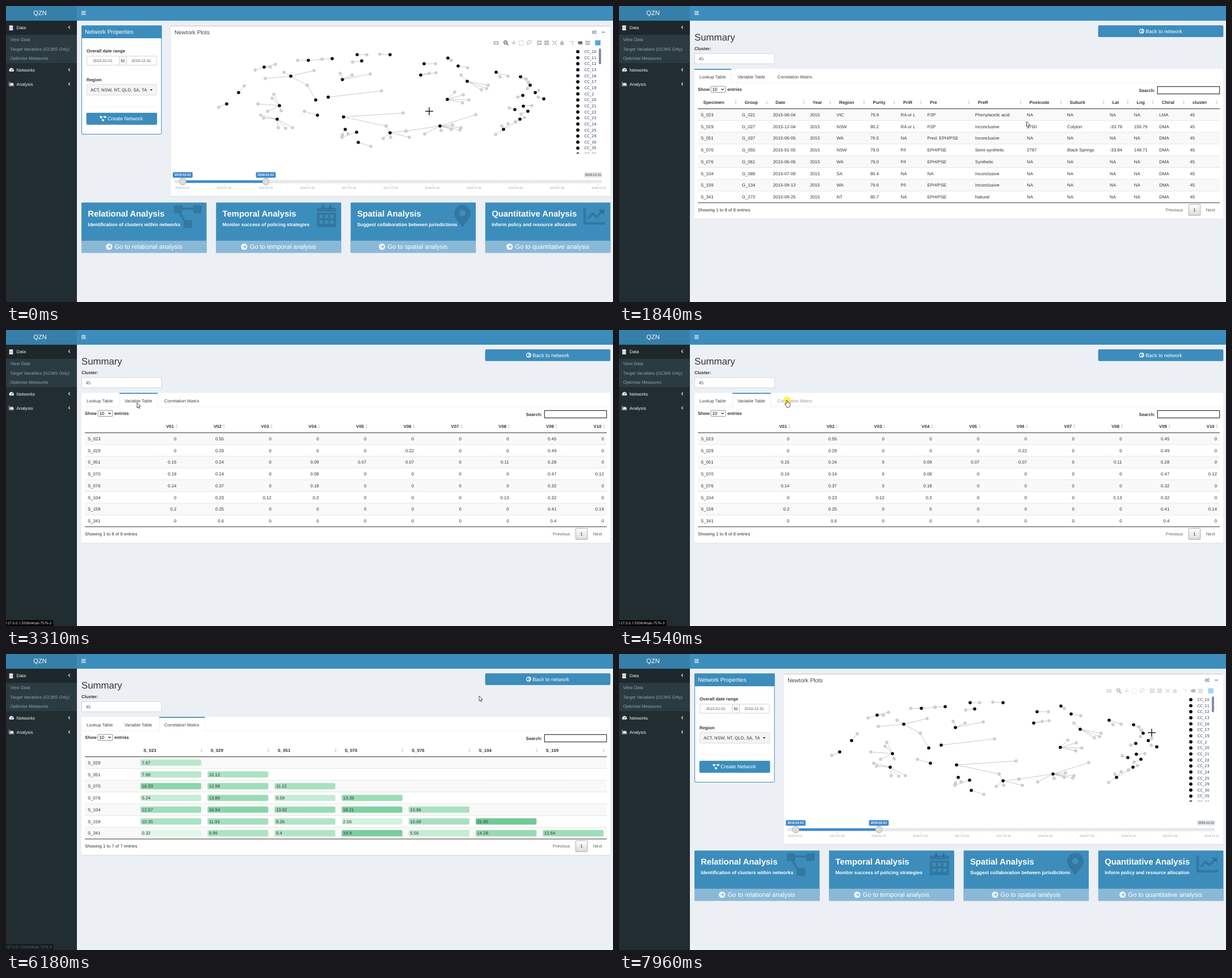
An HTML page with a canvas that plays this animation: 1070 by 523 pixels, repeating every 8.04 s.

```html
<!DOCTYPE html>
<html lang="en">
<head>
<meta charset="utf-8">
<title>Network dashboard</title>
<style>
html, body { margin: 0; width: 100%; height: 100%; overflow: hidden; background: #ecf0f5; }
canvas { display: block; }
</style>
</head>
<body>
<canvas id="stage" width="1070" height="523"></canvas>
<script>
const ctx = document.getElementById('stage').getContext('2d');
const LOOP = 8040;
const BLUE = '#3c8dbc', SHADE = 'rgba(0,0,0,0.15)';
const SANS = '"Liberation Sans", Arial, sans-serif';

// ---------- drawing helpers ----------
function text(str, x, y, size = 7.8, color = '#333', { bold, align = 'left', family = SANS } = {}) {
  ctx.font = `${bold ? 'bold ' : ''}${size}px ${family}`;
  ctx.textAlign = align;
  ctx.fillStyle = color;
  ctx.fillText(str, x, y + size * 0.355);
}
const bold = (str, x, y, size, color, align) => text(str, x, y, size, color, { bold: true, align });

function paint(fill, stroke, width = 1) {
  if (fill) { ctx.fillStyle = fill; ctx.fill(); }
  if (stroke) { ctx.strokeStyle = stroke; ctx.lineWidth = width; ctx.stroke(); }
}
function box(x, y, w, h, fill, stroke, radius = 0, width = 1) {
  ctx.beginPath();
  ctx.roundRect(x, y, w, h, radius);
  paint(fill, stroke, width);
}
function disc(x, y, r, fill, stroke, width) {
  ctx.beginPath();
  ctx.arc(x, y, r, 0, 7);
  paint(fill, stroke, width);
}
function trace(points, close) {
  ctx.beginPath();
  for (let i = 0; i < points.length; i += 2) ctx.lineTo(points[i], points[i + 1]);
  if (close) ctx.closePath();
}
function line(points, color, width = 1) {
  trace(points);
  paint(null, color, width);
}
function poly(points, fill, stroke, width) {
  trace(points, true);
  paint(fill, stroke, width);
}
function at(x, y, scale, draw) {
  ctx.save();
  ctx.translate(x, y);
  ctx.scale(scale, scale);
  draw();
  ctx.restore();
}

// ---------- icons ----------
function diagramIcon(x, y, scale, color) {
  at(x, y, scale, () => {
    for (const [sx, sy] of [[0, 0], [34, 0], [17, 26]]) box(sx, sy, 15, 14, color, null, 2);
    line([15, 6, 34, 6], color, 4);
    line([10, 14, 18, 26], color, 4);
  });
}
function calendarIcon() {
  box(557, 351, 4, 7, SHADE);
  box(570, 351, 4, 7, SHADE);
  box(548, 356, 34, 7, SHADE, null, [3, 3, 0, 0]);
  ctx.beginPath();
  ctx.roundRect(548, 365, 34, 26, [0, 0, 3, 3]);
  for (let i = 0; i < 6; i++) ctx.rect(552.5 + (i % 3) * 9.5, 369 + (i > 2) * 10, 6, 6);
  ctx.fillStyle = SHADE;
  ctx.fill('evenodd');
}
function pinIcon() {
  ctx.beginPath();
  ctx.moveTo(804.5, 391);
  ctx.bezierCurveTo(795, 378, 790, 374, 790, 366);
  ctx.arc(804.5, 366, 14.5, Math.PI, 0);
  ctx.bezierCurveTo(819, 374, 814, 378, 804.5, 391);
  ctx.moveTo(810, 366);
  ctx.arc(804.5, 366, 5.5, 0, 7);
  ctx.fillStyle = SHADE;
  ctx.fill('evenodd');
}
function trendIcon() {
  line([1020, 356, 1020, 384, 1056, 384], SHADE, 4.5);
  line([1026, 376, 1034, 367, 1041, 373, 1051, 363], SHADE, 4.5);
  poly([1044, 359, 1055, 359, 1055, 370], SHADE);
}
function circleArrow(x, y, r, dir, color) {
  disc(x, y, r, '#fff');
  line([x - dir * 3.2, y, x + dir * 2.6, y], color, 1.5);
  line([x, y - 3, x + dir * 3, y, x, y + 3], color, 1.5);
}
function modebar(alpha) {
  if (!alpha) return;
  const pale = '#bdbdbd', dark = '#6e6e6e', y = 65;
  ctx.save();
  ctx.globalAlpha = alpha;
  box(859.5, 62, 9, 6.5, pale, null, 1);
  disc(864, 65.3, 1.8, '#fff');
  disc(880.5, 64.3, 2.8, null, dark, 1.4);
  line([882.5, 66.5, 885.5, 69.5], dark, 1.6);
  line([878.8, 64.3, 882.2, 64.3], dark, 0.8);
  line([891, y, 899, y], pale, 1.3);
  line([895, 61, 895, 69], pale, 1.3);
  ctx.setLineDash([1.5, 1]);
  box(904.5, 61.5, 7.5, 7.5, null, pale);
  ctx.setLineDash([]);
  ctx.beginPath();
  ctx.ellipse(922, 64, 4, 2.6, -0.3, 0, 7);
  paint(null, pale, 1.2);
  line([919, 66, 920, 69], pale, 1.2);
  for (const x of [940, 953]) {
    box(x - 4, 61, 8, 8, pale);
    line([x - 2.5, y, x + 2.5, y], '#fff', 1.2);
  }
  line([940, 62.5, 940, 67.5], '#fff', 1.2);
  line([963, 61, 971, 69], pale, 1.3);
  line([971, 61, 963, 69], pale, 1.3);
  disc(967, y, 1.6, '#fff', pale);
  poly([975.5, 65.5, 980, 61, 984.5, 65.5, 983, 65.5, 983, 69, 977, 69, 977, 65.5], pale);
  line([993, 62.5, 999, 62.5, 999, 69], pale, 1.2);
  poly([1007.5, y, 1010, 62.3, 1016, 62.3, 1016, 67.7, 1010, 67.7], dark);
  box(1021, 61.5, 8.5, 3.2, pale);
  box(1021, 65.7, 8.5, 3.2, pale);
  box(1038.5, 60.5, 9.5, 9, '#46a9df');
  ctx.restore();
}

// ---------- frame around every page ----------
function shell() {
  box(0, 0, 1070, 523, '#ecf0f5');
  box(125, 0, 945, 26, BLUE);
  box(0, 0, 125, 26, '#367fa9');
  text('QZN', 60, 12, 11.1, '#fff', { align: 'center' });
  for (const y of [9, 11.7, 14.4]) box(133, y, 7.5, 1.2, '#fff');
  box(0, 26, 125, 497, '#222d32');
  box(0, 26, 125, 25, '#1e282c');
  box(0, 51, 125, 50, '#2c3b41');

  for (const y of [34.5, 37.5, 40.5]) box(5.5, y, 7, 2.4, '#fff', null, 1);
  ctx.beginPath();
  ctx.arc(9.7, 113.7, 4.2, 2.6, 0.54);
  ctx.closePath();
  paint('#e4eaec');
  line([9.7, 114.5, 11.3, 111], '#222d32', 0.9);
  line([5.8, 134, 5.8, 141, 14, 141], '#e4eaec', 1);
  poly([7, 140, 7, 137.5, 9, 135, 10.5, 136.8, 12, 135.5, 13.4, 138, 13.4, 140], '#e4eaec');

  [['Data', 38], ['Networks', 113], ['Analysis', 138]].forEach(([name, y]) => {
    text(name, 18.5, y, 7.8, '#eef2f3');
    line([112.7, y - 2.8, 110.2, y - 0.4, 112.7, y + 2], '#eef2f3', 1.1);
  });
  ['View Data', 'Target Variables (GCMS Only)', 'Optimise Measures']
    .forEach((name, i) => text(name, 7.3, 59 + i * 16.8, 7.8, '#8aa4af'));
}

// ---------- network page ----------
const stars = [];
const star = (x, y, ...leaves) => stars.push({ x, y, leaves });
star(455, 108, 475, 103, 439, 113, 466, 108);
star(502, 124, 490, 117, 543, 114, 457, 128, 531, 140);
star(546, 166, 531, 140);
star(533, 96, 514, 96, 557, 94);
star(575, 93, 557, 94);
star(410, 153, 420, 141);
star(389, 173, 375, 179);
star(482, 176, 472, 156, 469, 163, 444, 173, 461, 186, 485, 185);
star(478, 200, 449, 193, 454, 198, 480, 215, 493, 216, 505, 215);
star(549, 193, 526, 186);
star(568, 161, 662, 150);
star(595, 196, 700, 189, 670, 212);
star(677, 224, 670, 212, 665, 234, 678, 232, 711, 232, 705, 221);
star(765, 212, 705, 221, 738, 226, 828, 192, 787, 210, 802, 215, 767, 220, 785, 218, 800, 219);
star(598, 218, 593, 228, 603, 226);
star(618, 223, 592, 232);
star(621, 241, 643, 248);
star(593, 130, 589, 119, 610, 122, 642, 120);
star(627, 97, 611, 99);
star(619, 86, 636, 86);
star(677, 86, 659, 85);
star(737, 102, 757, 102);
star(731, 122, 746, 119, 758, 118);
star(779, 92, 785, 96);
star(797, 106, 814, 109);
star(813, 133, 802, 122, 850, 140, 847, 146, 838, 148);
star(778, 165, 791, 152, 806, 157, 816, 166, 805, 171);
star(864, 117, 885, 124, 871, 125);
star(907, 125, 917, 129, 921, 135);
star(924, 140, 921, 135, 919, 146);
star(933, 153, 939, 149);
star(948, 164, 938, 161);
star(911, 158, 902, 161);
star(912, 177, 927, 176);
star(897, 183, 887, 180);
star(920, 186, 908, 191);
star(906, 200, 914, 197, 898, 205);
star(877, 218, 874, 212, 885, 208, 898, 205, 863, 227);

function graph() {
  const eachLeaf = draw => stars.forEach(({ x, y, leaves }) => {
    for (let i = 0; i < leaves.length; i += 2) draw(leaves[i], leaves[i + 1], x, y);
  });
  eachLeaf((lx, ly, x, y) => line([x, y, lx, ly], '#b0b0b0', 0.7));
  eachLeaf((lx, ly) => disc(lx, ly, 2.5, '#d2d2d2', '#bcbcbc', 0.6));
  stars.forEach(({ x, y }) => disc(x, y, 2.8, '#000'));
}
function legend() {
  ctx.save();
  ctx.beginPath();
  ctx.rect(1000, 70, 60, 190.5);
  ctx.clip();
  [10, 11, 12, 13, 16, 17, 19, 2, 20, 21, 22, 23, 24, 25, 29, 30, 35, 36].forEach((id, i) => {
    const y = 80.7 + i * 10.65;
    disc(1008, y, 2.9, '#000');
    text('CC_' + id, 1019.5, y, 6.7, '#2a3f5f', { family: '"DejaVu Sans", Verdana, sans-serif' });
  });
  ctx.restore();
  box(1045, 75, 4, 28, '#808bA4', null, 2);
}
function slider() {
  box(297, 308, 753, 4.5, '#e8eaee', '#d5d8de', 2, 0.6);
  box(311.5, 308, 146.5, 4.5, '#428bca');
  for (let i = 0; i <= 40; i++) {
    const x = 311.3 + i * 18.33;
    line([x, 313.5, x, i % 4 ? 315.5 : 318], '#c4c4c4', 0.6);
  }
  ['2015-01-01', '2015-07-03', '2016-01-02', '2016-07-03', '2017-01-02', '2017-07-04',
    '2018-01-03', '2018-07-05', '2019-01-04', '2019-07-06', '2019-12-31']
    .forEach((day, i) => text(day, 311 + i * 73.4, 321.7, 5, '#999', { align: 'center' }));
  for (const [x, day] of [[311.5, '2015-01-01'], [458, '2016-01-01']]) {
    disc(x, 310, 6, '#dcdcdc', '#a5a5a5', 0.8);
    box(x - 17.5, 293.5, 35, 10, '#428bca', null, 2);
    bold(day, x, 298.5, 5.6, '#fff', 'center');
  }
  box(1019, 293.5, 32, 9.5, '#e1e4e9', null, 2);
  text('2019-12-31', 1035, 298.3, 5.6, '#333', { align: 'center' });
}
function propertiesPanel() {
  box(133.5, 35, 140.5, 191.5, '#fff', BLUE, 1.5);
  box(133, 34.5, 141.5, 22.5, BLUE);
  text('Network Properties', 139, 45.5, 10.05, '#fff');
  bold('Overall date range', 142, 79.5);
  box(142.5, 88.5, 122.5, 16, '#fff', '#d2d6de');
  box(199.5, 88.5, 13, 16, '#f6f7f8', '#d2d6de');
  text('2015-01-01', 170.5, 96.5, 6.7, '#555', { align: 'center' });
  text('to', 205.8, 96.5, 7.8, '#333', { align: 'center' });
  text('2019-12-31', 238.3, 96.5, 6.7, '#555', { align: 'center' });
  bold('Region', 142, 130);
  box(142.5, 138.5, 123, 19, '#f4f4f4', '#ddd', 1.5);
  text('ACT, NSW, NT, QLD, SA, TA', 149, 148);
  poly([253.5, 147, 258.5, 147, 256, 149.7], '#333');
  line([142, 178, 265, 178], '#f0f0f0');
  box(142, 189, 124, 20.5, BLUE, '#367fa9', 1.5, 0.6);
  diagramIcon(165.5, 194.5, 0.225, '#fff');
  text('Create Network', 179, 199, 9, '#fff');
}
function widgets() {
  const items = [
    ['Relational', 'Identification of clusters within networks'],
    ['Temporal', 'Monitor success of policing strategies'],
    ['Spatial', 'Suggest collaboration between jurisdictions'],
    ['Quantitative', 'Inform policy and resource allocation'],
  ];
  items.forEach(([name, note], i) => {
    const x = 133 + i * 237.3, label = `Go to ${name.toLowerCase()} analysis`;
    box(x, 348, 220.5, 89, 'rgba(0,0,0,0.1)', null, 1);
    box(x, 347.3, 220.5, 88.7, BLUE, null, 1);
    box(x, 414.7, 220.5, 21.3, '#8ab9d7', null, [0, 0, 1, 1]);
    bold(name + ' Analysis', x + 11.3, 366.5, 14.8, '#fff');
    bold(note, x + 11.3, 386.5, 8.42, '#fff');
    ctx.font = `11.15px ${SANS}`;
    const left = x + 110.2 - (ctx.measureText(label).width + 15) / 2;
    circleArrow(left + 5.5, 425.3, 5.5, 1, '#8ab9d7');
    text(label, left + 15.2, 425.5, 11.15, '#fff');
  });
  diagramIcon(296, 352, 1, SHADE);
  calendarIcon();
  pinIcon();
  trendIcon();
}
function hoverLabel() {
  poly([767, 212, 771, 208.5, 771, 201.5, 822, 201.5, 822, 222.5, 771, 222.5, 771, 215.5], '#000');
  ['Cluster: 45', 'Specimens: 8'].forEach((s, i) => text(s, 774, 207.5 + i * 9.3, 7, '#fff'));
}
function networkPage(barAlpha, hovering) {
  propertiesPanel();
  box(291, 35.5, 774, 301.5, 'rgba(0,0,0,0.1)', null, 1.5);
  box(291, 34.5, 774, 301.5, '#fff', null, 1.5);
  box(291, 34.5, 774, 1.7, '#d2d6de', null, 1);
  text('Newtork Plots', 297, 46.5, 10.05, '#444');
  disc(1035.7, 46.3, 2, null, '#7f93ab', 1.5);
  disc(1039.7, 44.2, 1, null, '#7f93ab', 1);
  disc(1039.7, 48.2, 1, null, '#7f93ab', 1);
  box(1050, 45.5, 6, 1.5, '#7f93ab');
  modebar(barAlpha);
  graph();
  legend();
  slider();
  widgets();
  if (hovering) hoverLabel();
}

// ---------- summary page ----------
const rows = (...lines) => lines.map(s => s.split('|'));
const lookupHeads = 'Specimen|Group|Date|Year|Region|Purity|PriR|Pre|PreR|Postcode|Suburb|Lat|Lng|Chiral|cluster'.split('|');
const small = {
  x: [144, 222, 280.5, 350, 400.5, 464, 521, 593.3, 654.8, 713.7, 789.5, 854.3, 897.3, 944.5, 1002],
  rows: rows(
    'S_141|G_121|2015-07-12|2015|VIC|77.8|Poss. Emde|EPH/PSE|Synthetic|NA|NA|NA|NA|DMA|16',
    'S_296|G_231|2015-04-22|2015|NT|78.8|Poss. Emde|EPH/PSE|Natural|NA|NA|NA|NA|DMA|16'),
};
const large = {
  x: [144, 216.8, 271.5, 336.7, 383.5, 443, 496.5, 543.5, 627.8, 719, 790, 865, 907.8, 952.3, 1006.3],
  rows: rows(
    'S_023|G_021|2015-06-04|2015|VIC|79.9|RA or L|P2P|Phenylacetic acid|NA|NA|NA|NA|LMA|45',
    'S_029|G_027|2015-12-04|2015|NSW|80.2|RA or L|P2P|Inconclusive|2760|Colyton|-33.78|150.79|DMA|45',
    'S_051|G_037|2015-06-05|2015|WA|76.5|NA|Pred. EPH/PSE|Inconclusive|NA|NA|NA|NA|DMA|45',
    'S_070|G_055|2015-01-05|2015|NSW|79.0|P/I|EPH/PSE|Semi-synthetic|2787|Black Springs|-33.84|149.71|DMA|45',
    'S_076|G_061|2015-06-06|2015|WA|79.0|P/I|EPH/PSE|Synthetic|NA|NA|NA|NA|DMA|45',
    'S_104|G_088|2015-07-09|2015|SA|80.4|NA|NA|Inconclusive|NA|NA|NA|NA|DMA|45',
    'S_159|G_134|2015-09-13|2015|WA|79.6|P/I|EPH/PSE|Inconclusive|NA|NA|NA|NA|DMA|45',
    'S_341|G_272|2015-09-25|2015|NT|80.7|NA|EPH/PSE|Natural|NA|NA|NA|NA|DMA|45'),
};
const variables = rows(
  'S_023|0|0.55|0|0|0|0|0|0|0.45|0',
  'S_029|0|0.29|0|0|0|0.22|0|0|0.49|0',
  'S_051|0.15|0.24|0|0.09|0.07|0.07|0|0.11|0.28|0',
  'S_070|0.19|0.14|0|0.08|0|0|0|0|0.47|0.12',
  'S_076|0.14|0.37|0|0.18|0|0|0|0|0.32|0',
  'S_104|0|0.23|0.12|0.2|0|0|0|0.13|0.32|0',
  'S_159|0.2|0.25|0|0|0|0|0|0|0.41|0.14',
  'S_341|0|0.6|0|0|0|0|0|0|0.4|0');
const correlations = rows(
  'S_029|7.67',
  'S_051|7.99|10.12',
  'S_070|16.33|12.96|11.12',
  'S_076|5.24|13.86|5.59|13.39',
  'S_104|12.57|16.94|13.92|19.21|10.86',
  'S_159|10.35|11.93|9.26|2.56|10.69|21.95',
  'S_341|0.32|9.99|9.4|19.9|5.56|14.28|12.64');

const HEAD_Y = 170.3, TOP = 181.6, ROW = 20.76;
const rowY = i => TOP + ROW * (i + 0.5);

function sortMark(x) {
  poly([x - 2, 169.5, x, 166.5, x + 2, 169.5], '#d3d3d3');
  poly([x - 2, 171, x, 174, x + 2, 171], '#d3d3d3');
}
function lookupTable({ x, rows }) {
  lookupHeads.forEach((head, c) => {
    bold(head, x[c] + 4.6, HEAD_Y);
    sortMark((x[c + 1] || 1064.5) - 11);
  });
  rows.forEach((row, r) => row.forEach((cell, c) => text(cell, x[c], rowY(r))));
}
function variableTable() {
  variables.forEach((row, r) => row.forEach((cell, c) => {
    const right = 216.7 + c * 83.73;
    text(cell, c ? right : 144, rowY(r), 7.8, '#333', { align: c ? 'right' : 'left' });
    if (c && !r) {
      bold('V' + String(c).padStart(2, '0'), right - 4.4, HEAD_Y, 7.8, '#333', 'right');
      sortMark(right);
    }
  }));
}
function tileColor(value) {
  const p = (value - 0.32) / 21.63;
  return `rgb(${222 - 109 * p},${247 - 45 * p},${233 - 82 * p})`;
}
function correlationTable() {
  ['S_023', 'S_029', 'S_051', 'S_070', 'S_076', 'S_104', 'S_159'].forEach((head, c) => {
    bold(head, 242.3 + c * 118.2, HEAD_Y);
    sortMark(344.5 + c * 118.2);
  });
  correlations.forEach(([name, ...cells], r) => {
    text(name, 144, rowY(r));
    cells.forEach((value, c) => {
      const x = 237 + c * 118.2;
      box(x, rowY(r) - 5.6, 107.2, 11.2, tileColor(value), null, 2);
      text(value, x + 2.5, rowY(r));
    });
  });
}

const views = {
  small: { tab: 0, count: 2, draw: () => lookupTable(small) },
  large: { tab: 0, count: 8, draw: () => lookupTable(large) },
  variable: { tab: 1, count: 8, draw: variableTable },
  correlation: { tab: 2, count: 7, draw: correlationTable },
};

function summaryPage({ tab, count, draw }, hoveredTab) {
  const bottom = TOP + ROW * count;
  box(845, 34.5, 220, 20, BLUE, '#367fa9', 1.5, 0.6);
  circleArrow(921.3, 44.3, 4.4, -1, BLUE);
  text('Back to network', 928.3, 44.3, 9.05, '#fff');
  text('Summary', 133, 55, 16.75);
  bold('Cluster:', 133, 75.3);
  box(133.5, 84, 140.5, 18, '#fff', '#d2d6de');
  text('45', 140.5, 93.3, 7.8, '#555');

  box(133, 112, 932, bottom - 83.2, 'rgba(0,0,0,0.1)', null, 1.5);
  box(133, 111, 932, bottom - 82.8, '#fff', null, 1.5);
  line([133, 135.7, 1065, 135.7], '#f0f0f0');
  [['Lookup Table', 133, 65], ['Variable Table', 200, 67.5], ['Correlation Matrix', 270, 80.5]]
    .forEach(([name, x, w], i) => {
      if (i === tab) {
        box(x + 0.5, 111.5, w - 1, 25, '#fff', '#f0f0f0');
        box(x + 1, 134, w - 2, 4, '#fff');
        box(x, 111, w, 1.8, BLUE);
      }
      text(name, x + 9, 124.8, 7.8, i === hoveredTab ? '#999' : '#444');
    });

  bold('Show', 139, 147.3);
  box(162, 142, 26, 10.5, '#fff', '#767676', 1, 0.8);
  text('10', 164.5, 147.3, 7.8, '#000');
  line([180.3, 146.2, 182.5, 148.4, 184.7, 146.2], '#222', 1.1);
  bold('entries', 191, 147.3);
  bold('Search:', 916.5, 149);
  box(949.3, 142.3, 109.4, 13, '#fff', '#3a3a3a', 0, 1.2);

  for (let r = 0; r < count; r++) {
    const y = TOP + ROW * r;
    if (r % 2 === 0) box(139, y, 920, ROW, '#f9f9f9');
    if (r) line([139, y, 1059, y], '#ddd', 0.7);
  }
  draw();
  line([139, TOP, 1059, TOP], '#222', 0.9);
  line([139, bottom, 1059, bottom], '#222', 0.9);

  const y = bottom + 12.5;
  text(`Showing 1 to ${count} of ${count} entries`, 139, y);
  text('Previous', 963.7, y, 7.8, '#666');
  const shade = ctx.createLinearGradient(0, y - 10, 0, y + 10);
  shade.addColorStop(0, '#fff');
  shade.addColorStop(1, '#dcdcdc');
  box(1004.3, y - 9.7, 20.4, 19.6, shade, '#979797', 1, 0.8);
  text('1', 1014.5, y, 7.8, '#333', { align: 'center' });
  text('Next', 1034.7, y, 7.8, '#666');
}

function statusBar(alpha, tabNumber) {
  if (!alpha) return;
  ctx.save();
  ctx.globalAlpha = alpha;
  box(-1, 512, 85, 12, '#000', '#3c4043', 0, 0.6);
  text('127.0.0.1:5936/#tab-7576-' + tabNumber, -1, 518, 6.35, '#fff', { family: '"Open Sans", sans-serif' });
  ctx.restore();
}

// ---------- pointer ----------
const pointers = {
  cross() {
    line([-7, 0, 7, 0], '#000', 1.3);
    line([0, -7, 0, 7], '#000', 1.3);
  },
  arrow() {
    poly([0, 0, 0, 9, 2.1, 7.1, 3.5, 10.2, 4.8, 9.6, 3.5, 6.6, 6.2, 6.4], '#fff', '#222', 0.8);
  },
  hand() {
    poly([0, 0, 1.1, 1, 1.1, 4, 4.2, 4.6, 5.6, 5.4, 5.6, 9, 4.4, 12.4, -0.6, 12.4,
      -1.7, 9.5, -3.8, 6.5, -2.5, 5.9, -1, 7.2, -1, 1], '#fff', '#222', 0.8);
  },
};
// start, end, steps, target x, target y
const moves = [
  [380, 842, 7, 765, 211],
  [1690, 2470, 11, 232, 132],
  [2540, 2620, 2, 231, 128.5],
  [3620, 3930, 5, 298, 125],
  [4080, 4080, 1, 294, 124],
  [4160, 4160, 1, 296, 124],
  [5640, 6180, 8, 834, 74],
  [6260, 6410, 3, 893, 56],
  [6480, 6560, 2, 905, 46.5],
  [7810, 7960, 3, 939, 139],
];
function pointerAt(t) {
  let x = 746, y = 186;
  for (const [start, end, steps, tx, ty] of moves) {
    if (t < start) break;
    const done = Math.floor((t - start) / (end - start || 1) * (steps - 1) + 0.03) + 1;
    const p = Math.min(1, done / steps), e = p * p * (3 - 2 * p);
    x += (tx - x) * e;
    y += (ty - y) * e;
  }
  return [x, y];
}

// Last value whose start time has passed.
const timeline = (...keys) => t => keys.reduce((value, [start, next]) => (t >= start ? next : value), null);
const viewAt = timeline([0, 'network'], [1073, 'small'], [1230, 'large'], [3230, 'variable'],
  [4790, 'correlation'], [6790, 'network']);
const shapeAt = timeline([0, 'cross'], [1073, 'arrow'], [2470, 'hand'], [3310, 'arrow'], [3850, 'hand'],
  [4860, 'arrow'], [6480, 'hand'], [6880, 'arrow'], [7810, 'cross']);
const hoveredTabAt = timeline([2470, 1], [3230, null], [3850, 2], [4790, null]);
const statusAt = timeline([0, 0], [2770, 0.5], [2850, 1], [6100, 0.75], [6180, 0.35], [6260, 0]);
const modebarAt = timeline([0, 1], [6790, 0], [7880, 0.2], [7960, 0.5]);
const hoverAt = timeline([842, true], [1073, false], [6790, true], [7880, false]);
const clickAt = timeline([919, true], [1073, false], [3080, true], [3230, false],
  [4540, true], [4710, false], [6710, true], [6790, false]);

function render(t) {
  const view = viewAt(t);
  shell();
  if (view === 'network') networkPage(modebarAt(t), hoverAt(t));
  else summaryPage(views[view], hoveredTabAt(t));
  statusBar(statusAt(t), t < 3850 ? 2 : 3);
  const [x, y] = pointerAt(t);
  if (clickAt(t)) disc(x, y, 6.7, 'rgba(255,240,0,0.65)');
  at(x, y, 1, pointers[shapeAt(t)]);
}

ctx.lineJoin = 'round';
ctx.textRendering = 'geometricPrecision';
const began = performance.now();
function tick() {
  render((performance.now() - began) % LOOP);
  requestAnimationFrame(tick);
}
tick();
</script>
</body>
</html>
```
